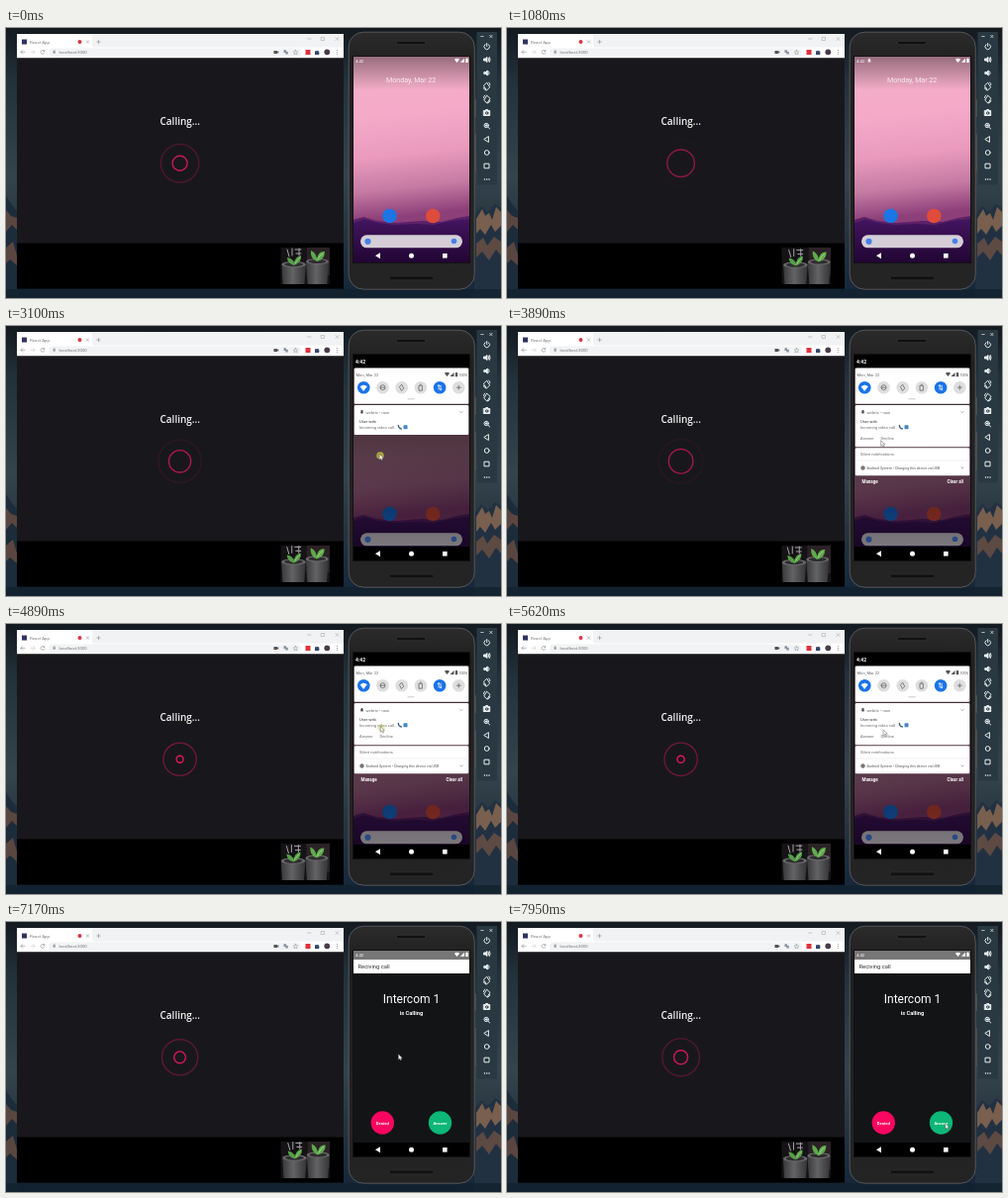
These frames come from a looping animation (500 px wide and 273 px high, 8000 ms). An HTML page:

```html
<!DOCTYPE html>
<html lang="en">
<head>
<meta charset="utf-8">
<title>Video call</title>
<style>
  html, body { margin: 0; width: 100%; height: 100%; overflow: hidden; background: #14202c; }
  svg { display: block; width: 100%; height: 100%; }
  text { font-family: Roboto, sans-serif; }
  .line { fill: none; stroke-linecap: round; stroke-linejoin: round; }
  .mid { text-anchor: middle; }
  .small { font-size: 4.1px; fill: #6b6b6b; }
</style>
</head>
<body>
<svg viewBox="0 0 500 273">
  <defs>
    <linearGradient id="night" x2="0" y2="1">
      <stop stop-color="#131a20"/><stop offset=".2" stop-color="#23313b"/><stop offset=".55" stop-color="#35434c"/>
      <stop offset=".75" stop-color="#26343f"/><stop offset="1" stop-color="#14263a"/>
    </linearGradient>
    <linearGradient id="sky" x2=".06" y2="1">
      <stop stop-color="#f3b0c8"/><stop offset=".3" stop-color="#f5aac8"/><stop offset=".5" stop-color="#e99abd"/>
      <stop offset=".66" stop-color="#c67ba4"/><stop offset=".8" stop-color="#8c3f78"/>
    </linearGradient>
    <linearGradient id="skyShade" x2="0" y2="1">
      <stop stop-opacity=".38"/><stop offset="1" stop-opacity="0"/>
    </linearGradient>
    <linearGradient id="ground" x2="0" y2="1">
      <stop stop-color="#431560"/><stop offset="1" stop-color="#220534"/>
    </linearGradient>
    <linearGradient id="dim" x2="0" y2="1">
      <stop stop-opacity=".78"/><stop offset=".4" stop-opacity=".66"/><stop offset="1" stop-opacity=".42"/>
    </linearGradient>
    <linearGradient id="body" x2="0" y2="1">
      <stop stop-color="#2b2b2c"/><stop offset=".12" stop-color="#202021"/><stop offset="1" stop-color="#242425"/>
    </linearGradient>
    <linearGradient id="pot">
      <stop stop-color="#39393b"/><stop offset=".45" stop-color="#636365"/><stop offset="1" stop-color="#343436"/>
    </linearGradient>
    <clipPath id="camClip"><rect x="277.5" y="222" width="49.5" height="37"/></clipPath>
    <clipPath id="screenClip"><rect x="351" y="29" width="117" height="208"/></clipPath>
    <clipPath id="shadeClip"><rect id="shadeBox" x="351.5" y="29" width="116" height="0" rx="1.5"/></clipPath>
    <path id="wifi" d="M-2.6-1.3Q0-3.3 2.6-1.3L0 2Z"/>
    <path id="cell" d="M2 2H-2L2-2Z"/>
    <path id="battery" d="M-1.2-1.7H-.5V-2.3H.5V-1.7H1.2V2.2H-1.2Z"/>
    <path id="bell" d="M-1.7 1.2L-1.2.4V-.7Q-1.1-2 0-2.2Q1.1-2 1.2-.7V.4L1.7 1.2ZM-.5 1.5H.5L0 2Z"/>
    <path id="chevron" class="line" d="M-1.2-.5L0 .7L1.2-.5" stroke="#777" stroke-width=".6"/>
  </defs>

  <!-- Desktop -->
  <rect width="500" height="273" fill="url(#night)"/>
  <path d="M0 170L5 178L12 186V273H0Z" fill="#1c2c3b"/>
  <path d="M0 184L5 190L11 192V204L6 199L0 206ZM0 222L7 216L11 230V240L4 234L0 238Z" fill="#5a4640"/>
  <path d="M473 190L480 180L487 186L494 178L500 182V273H473Z" fill="#223142"/>
  <path d="M475 193L481 183L484 190L488 187L491 194L495 181L500 186V200L494 206L490 199L484 209L479 203L475 208Z" fill="#785f4e"/>
  <path d="M475 218L482 212L486 220L493 211L500 216V230L495 224L488 235L481 226L475 232Z" fill="#5c4a43"/>
  <path d="M0 264H500V273H0Z" fill="#12212e" opacity=".8"/>

  <!-- Browser -->
  <rect x="11" y="6" width="330" height="257.700"/>
  <rect x="11" y="6" width="330" height="24.500" fill="#fff"/>
  <path d="M87 6H341V19.500H89Q87 19 87 17Z" fill="#f1f2f4"/>
  <rect x="16" y="11.500" width="5" height="5" fill="#31335f"/>
  <text x="24" y="15.800" font-size="4.400" fill="#777">React App</text>
  <circle cx="74.500" cy="14" r="2" fill="#d93444"/>
  <g class="line" stroke="#8b8b8b" stroke-width=".6">
    <path d="M81.200 12.700L83.800 15.300M83.800 12.700L81.200 15.300M91.800 14H95.200M93.500 12.300V15.700"/>
    <path d="M304.500 11H308M318.500 9.500H321.500V12.500H318.500ZM333 9.500L336 12.500M336 9.500L333 12.500" stroke="#aaa"/>
    <path d="M19.200 24.300H15M16.800 22.400L15 24.300L16.800 26.200"/>
    <path d="M25 24.300H29M27.300 22.400L29 24.300L27.300 26.200" stroke="#ccc"/>
    <path d="M38.600 23.300A1.900 1.900 0 1 0 38.800 25M38.900 22.200V23.500H37.600"/>
  </g>
  <rect x="43" y="20.600" width="255" height="7.800" rx="3.900" fill="#f1f3f4"/>
  <rect x="47.500" y="23.400" width="2.400" height="2.200" fill="#999"/>
  <path d="M48 23.400V22.400H49.400V23.400" class="line" stroke="#999" stroke-width=".4"/>
  <text x="53.500" y="26" font-size="4.300" fill="#777">localhost:3000</text>
  <path d="M270.500 23H274V24L275.300 23.200V25.800L274 25V26H270.500Z" fill="#555"/>
  <path d="M280.500 22.300H283V25H280.500ZM282.300 23.700H284.800V26.500H282.300Z" fill="#8a93a0"/>
  <path d="M292.500 22.300L293.200 23.800L294.800 24L293.600 25.100L294 26.700L292.500 25.900L291 26.700L291.400 25.100L290.200 24L291.800 23.800Z" class="line" stroke="#888" stroke-width=".5"/>
  <rect x="302.500" y="22" width="5" height="5" fill="#e0323c"/>
  <path d="M312 23.200H313.400A.9.9 0 0 1 315 23.200H316.200V24.600A.9.9 0 0 1 316.200 26V27H312Z" fill="#35476a"/>
  <circle cx="324.300" cy="24.300" r="2.900" fill="#4a3b48"/>
  <g fill="#777"><circle cx="334.300" cy="22.600" r=".5"/><circle cx="334.300" cy="24.400" r=".5"/><circle cx="334.300" cy="26.200" r=".5"/></g>
  <rect x="11" y="30.500" width="330" height="187" fill="#18181c"/>
  <text class="mid" x="175.800" y="97.500" font-size="10" font-weight="600" fill="#f4f4f4" style="font-family:'Open Sans',sans-serif">Calling...</text>
  <g fill="none" stroke="#e6185c" stroke-width="1.400">
    <circle class="ring" cx="175.600" cy="136.800"/><circle class="ring" cx="175.600" cy="136.800"/>
  </g>

  <!-- Webcam preview -->
  <g clip-path="url(#camClip)">
    <rect x="277" y="222" width="51" height="38" fill="#151315"/>
    <g id="plants">
      <path d="M284 224L286 231M289 223V230M292 224H298M293 228H298M296 223V230" stroke="#a5a1a7" class="line"/>
      <path d="M304 220H332V250H304Z" fill="#2b2225"/>
      <path d="M278.500 239H303L301 264H280Z" fill="url(#pot)"/>
      <ellipse cx="290.700" cy="239" rx="12.200" ry="3.200" fill="#68686b"/><ellipse cx="290.700" cy="239" rx="9.500" ry="2.200" fill="#302d30"/>
      <path d="M303 236H326L324 264H305Z" fill="url(#pot)"/>
      <ellipse cx="314.500" cy="236" rx="11.500" ry="3" fill="#68686b"/><ellipse cx="314.500" cy="236" rx="9" ry="2" fill="#302d30"/>
      <path d="M291 240Q284 238 284 232Q290 233 291 238Q292 231 298 230Q299 237 291 240Z" fill="#559e48"/>
      <path d="M314 236Q307 233 308 225Q313 227 314 233Q316 225 322 226Q322 234 314 236Z" fill="#5faa4c"/>
      <path d="M292 238Q294 234 297 232M315 234Q317 229 320 228" stroke="#a5d58a" class="line" stroke-width=".9"/>
    </g>
  </g>

  <!-- Phone -->
  <rect x="472" y="72" width="3" height="18" rx="1" fill="#4b4b4d"/><rect x="472" y="107" width="3" height="39" rx="1" fill="#4b4b4d"/>
  <rect x="346.200" y="4.200" width="127" height="260" rx="15" fill="url(#body)" stroke="#565658"/>
  <rect x="350" y="28" width="119" height="210" fill="#111"/>
  <rect x="394" y="13.300" width="30" height="3.400" rx="1.700" fill="#111" stroke="#454547" stroke-width=".5"/>
  <rect x="387" y="251" width="45" height="3.800" rx="1.900" fill="#111" stroke="#39393b" stroke-width=".5"/>

  <g clip-path="url(#screenClip)">
    <g id="home">
      <rect x="351" y="29" width="117" height="208" fill="url(#sky)"/>
      <rect x="351" y="29" width="117" height="34" fill="url(#skyShade)"/>
      <path d="M351 194L361 191L374 195L394 197L420 195L440 196L456 192L468 190V237H351Z" fill="#5a2168"/>
      <path d="M351 197L362 193.500L376 197L392 199L414 198L432 199L450 195L468 193V237H351Z" fill="url(#ground)"/>
      <text class="mid" x="409.200" y="54.500" font-size="7.100" fill="#f8edf2">Monday, Mar 22</text>
      <circle cx="387.500" cy="190" r="7.300" fill="#1b75e5"/>
      <circle cx="431.300" cy="190" r="7.300" fill="#df4c3b"/>
      <rect x="358" y="209.300" width="103" height="13" rx="6.500" fill="#d5ced6"/>
      <circle cx="365.500" cy="215.800" r="3.100" fill="#4681e8"/>
      <circle cx="452.500" cy="215.500" r="2.800" fill="#4681e8"/>
    </g>
    <g id="call">
      <rect x="351" y="29" width="117" height="208" fill="#121415"/>
      <rect x="351" y="29" width="117" height="9" fill="#777"/>
      <rect x="351" y="38" width="117" height="14" fill="#fff"/>
      <rect x="351" y="223" width="117" height="14"/>
      <text x="355.500" y="46.800" font-size="5.800" fill="#333">Reciving call</text>
      <g class="mid" fill="#fff">
        <text x="409.500" y="82" font-size="12">Intercom 1</text>
        <text x="409.500" y="94" font-size="5.700" font-weight="700">is Calling</text>
        <circle cx="380.300" cy="203" r="11.700" fill="#fa0660"/>
        <circle cx="438.500" cy="203" r="11.700" fill="#0cb777"/>
        <text x="380.300" y="204.500" font-size="4.200" font-weight="700">Denied</text>
        <text x="438.500" y="204.500" font-size="4.200" font-weight="700">Answer</text>
      </g>
    </g>
    <rect id="statusShade" x="351" y="29" width="117" height="13"/>
    <g id="scrim">
      <rect x="351" y="42" width="117" height="181" fill="url(#dim)"/>
      <rect x="351" y="223" width="117" height="14"/>
      <text x="353" y="37.500" font-size="5" font-weight="700" fill="#fff">4:42</text>
    </g>
    <g id="status" fill="#fff">
      <text x="353" y="34.700" font-size="4.300">4:42</text>
      <use id="notice" href="#bell" x="366" y="33"/>
      <use href="#wifi" x="455.500" y="33"/><use href="#cell" x="461" y="32.700"/><use href="#battery" x="465.500" y="32.700"/>
    </g>

    <g clip-path="url(#shadeClip)">
      <g id="shade">
        <g fill="#fff">
          <rect x="351.500" y="42.500" width="116" height="36.300" rx="1.500"/>
          <rect x="351.500" y="80" width="116" height="42.300" rx="1.500"/>
          <rect x="351.500" y="123.300" width="116" height="28" rx="1.500"/>
        </g>
        <g id="shadeContent">
          <text x="353.500" y="50.500" class="small">Mon, Mar 22</text>
          <g fill="#555"><use href="#wifi" x="445.500" y="49"/><use href="#cell" x="450.500" y="49"/><use href="#battery" x="455" y="49"/></g>
          <text x="457.500" y="50.500" font-size="3.600" fill="#555">100%</text>
          <g id="tiles"></g>
          <path d="M405.500 73.800H412.500" stroke="#bbb" stroke-width=".8"/>
          <use href="#bell" x="359.500" y="87" fill="#555"/>
          <text x="363.500" y="88.500" class="small">webrtc • now</text>
          <use href="#chevron" x="460" y="87"/>
          <text x="357" y="97.500" class="small" style="fill:#333">User web</text>
          <text x="357" y="104" class="small">Incoming video call..</text>
          <path d="M396.300 100.500Q396.500 103.500 399.300 104" class="line" stroke="#31587f" stroke-width="1.300"/>
          <rect x="401.500" y="100.200" width="4" height="4" rx=".5" fill="#4287c4"/>
          <text x="357" y="114.700" class="small">Answer</text><text x="377.500" y="114.700" class="small">Decline</text>
          <text x="357" y="130.500" class="small">Silent notifications</text>
          <path d="M351.500 136H467.500" stroke="#e2e2e2" stroke-width=".5"/>
          <circle cx="359.500" cy="143.500" r="2.200" fill="#777"/>
          <text x="363.500" y="145" font-size="3.600" fill="#555">Android System • Charging this device via USB</text>
          <use href="#chevron" x="460" y="143.500"/>
          <g font-size="4.500" font-weight="700" fill="#fff"><text x="358.500" y="158.500">Manage</text><text x="461" y="158.500" text-anchor="end">Clear all</text></g>
        </g>
      </g>
    </g>
    <g fill="#fff"><path d="M378 227.300V233.300L373 230.300Z"/><circle cx="409.500" cy="230.300" r="2.500"/><rect x="441" y="228" width="4.600" height="4.600"/></g>
  </g>

  <!-- Emulator toolbar -->
  <rect x="475.500" y="4" width="20.500" height="154.500" fill="#293841"/>
  <g class="line" stroke="#e8eef0" stroke-width="1" transform="translate(485.700 0)">
    <path d="M-6 8.500H-3.500M3 7.300L5.300 9.700M5.300 7.300L3 9.700" stroke-width=".7"/>
    <path d="M0 15.500V18.500M-1.700 16.600A2.800 2.800 0 1 0 1.700 16.600"/>
    <path d="M-2.800 31H-1.500L.3 29.500V34.500L-1.500 33H-2.800Z" fill="#e8eef0"/><path d="M1.700 30.500Q2.600 32 1.700 33.500M2.700 29.500Q4.200 32 2.700 34.500"/>
    <path d="M-2.500 44.500H-1.200L.6 43V48L-1.200 46.500H-2.500Z" fill="#e8eef0"/><path d="M2 44Q3 45.500 2 47"/>
    <path d="M-3 58L0 55.200L3 60L0 62.800ZM-3.200 60.500Q-2.700 62.500-1 63M2 55Q3.200 56 3.200 57.500"/>
    <path d="M3 71L0 68.200L-3 73L0 75.800ZM3.200 73.500Q2.700 75.500 1 76M-2 68Q-3.200 69-3.200 70.500"/>
    <path d="M-3 83.500H-1.500L-1 82.500H1L1.500 83.500H3V88.500H-3Z" fill="#e8eef0"/><circle cy="86" r="1.200" stroke="#293841"/>
    <circle cx="-.5" cy="98.500" r="2.200"/><path d="M1.200 100.200L3 102M-1.500 98.500H.5M-.5 97.500V99.500"/>
    <path d="M1.700 110V115.500L-2.600 112.700Z"/><circle cy="126" r="2.400"/><rect x="-2.300" y="137.200" width="4.600" height="4.600"/>
    <path d="M-2.300 153H-2.200M0 153H.1M2.300 153H2.400" stroke-width="1.400"/>
  </g>

  <g id="cursor">
    <circle id="touch" r="3.800" fill="#c4c73b"/>
    <path d="M-.8-1.500V4.300L.6 3.100L1.500 5L2.500 4.500L1.600 2.700H3.400Z" fill="#fff" stroke="#333" stroke-width=".4"/>
  </g>
</svg>
<script>
const LOOP = 8000, RIPPLE = 1450, RIPPLE_START = 0.19, MAX_RADIUS = 23.5;
const $ = id => document.getElementById(id);
const clamp = v => Math.min(1, Math.max(0, v));
const show = (id, visible) => $(id).setAttribute('visibility', visible ? 'visible' : 'hidden');
const fade = (id, value) => $(id).setAttribute('opacity', value);

function bezier(x1, y1, x2, y2) {
  const at = (a, b, s) => 3 * a * s * (1 - s) ** 2 + 3 * b * s * s * (1 - s) + s ** 3;
  return x => {
    let low = 0, high = 1;
    for (let i = 0; i < 20; i++) {
      const mid = (low + high) / 2;
      if (at(x1, x2, mid) < x) low = mid; else high = mid;
    }
    return at(y1, y2, low);
  };
}
const grow = bezier(0, .2, .8, 1), vanish = bezier(.2, 0, .8, 1);

// Keys are [time, ...values], eased from one to the next.
function track(keys, t) {
  const next = keys.findIndex(key => key[0] > t);
  if (next === 0) return keys[0].slice(1);
  if (next < 0) return keys.at(-1).slice(1);
  const a = keys[next - 1], b = keys[next];
  const p = (t - a[0]) / (b[0] - a[0]), eased = p * p * (3 - 2 * p);
  return a.slice(1).map((v, i) => v + (b[i + 1] - v) * eased);
}

const cursorKeys = [
  [1150, 443, 130], [1730, 401, 66], [2200, 368, 36], [2600, 368, 36], [3080, 378, 131],
  [3500, 378, 131], [4250, 379, 105], [5300, 379, 105], [6300, 386.5, 119], [6950, 386.5, 119], [7750, 443.5, 205]
];
const shadeKeys = [[2620, 29], [3100, 110], [3650, 165], [5550, 165], [6560, 41], [6640, 29]];

const tileIcons = [
  'M-3-1Q0-3.5 3-1L0 3Z', 'M-2 0H2M-2.5 0A2.5 2.5 0 1 0 2.5 0A2.5 2.5 0 1 0-2.5 0',
  'M-2-1L0-3L2 1L0 3Z', 'M-1.5-2H1.5V3H-1.5ZM-.5-3H.5',
  'M-1 2V-2.5M-2-1.5L-1-2.5L0-1.5M1-2V2.5M0 1.5L1 2.5L2 1.5', 'M-2 0H2M0-2V2'
];
$('tiles').innerHTML = tileIcons.map((d, i) => {
  const on = i === 0 || i === 4;
  return `<g transform="translate(${361.3 + i * 19.2} 62.2)"><circle r="6.3" fill="${on ? '#1a73e8' : '#dedede'}"/>
    <path class="line" d="${d}" stroke="${on ? '#fff' : '#666'}" stroke-width=".8" ${i ? '' : 'style="fill:#fff"'}/></g>`;
}).join('');

const rings = document.querySelectorAll('.ring');

function draw() {
  const t = performance.now() % LOOP;

  rings.forEach((ring, i) => {
    const p = (t / RIPPLE + RIPPLE_START + i / 2) % 1;
    ring.setAttribute('r', MAX_RADIUS * grow(p));
    ring.setAttribute('opacity', 1 - vanish(p));
  });

  const sway = Math.sin(t / 900), bob = Math.sin(t / 620);
  $('plants').setAttribute('transform', `translate(${sway * .8} ${bob * .6})`);

  const [bottom] = track(shadeKeys, t);
  const open = clamp((bottom - 29) / 60), scrim = clamp((bottom - 45) / 50);
  $('shadeBox').setAttribute('height', bottom - 29);
  $('shade').setAttribute('transform', `translate(0 ${-9 * (1 - open)})`);
  fade('shadeContent', clamp((bottom - 45) / 40));
  fade('statusShade', clamp((bottom - 29) / 25));
  fade('scrim', scrim);
  fade('status', 1 - scrim);

  show('call', t >= 6680);
  show('notice', t >= 450 && t < 6900);

  const [x, y] = track(cursorKeys, t);
  $('cursor').setAttribute('transform', `translate(${x} ${y})`);
  show('cursor', t >= 1150);
  const pressed = t >= 2580 && t < 3250, hovering = (t >= 2250 && t < 2580) || (t >= 4850 && t < 5250);
  fade('touch', pressed ? .75 : hovering ? .35 : 0);

  requestAnimationFrame(draw);
}
draw();
</script>
</body>
</html>
```
